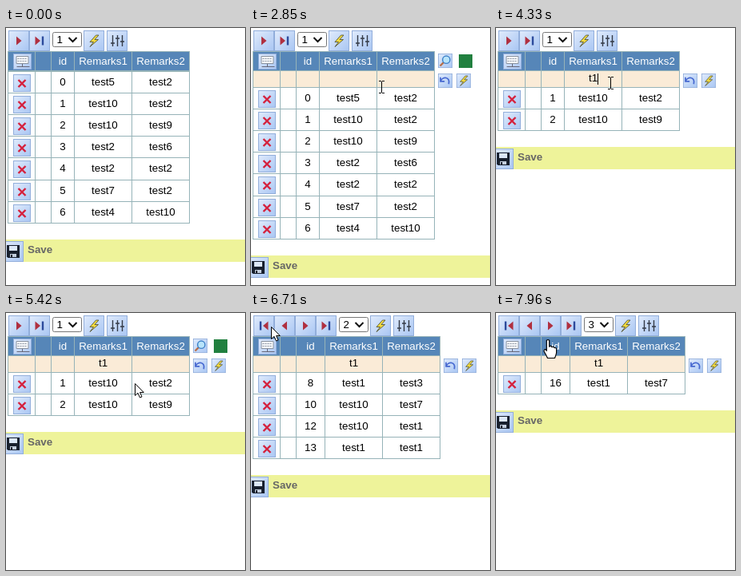
These frames come from a looping animation (299 by 322 pixels, 8 s). An HTML page:

```html
<!DOCTYPE html>
<html lang="en">
<head>
<meta charset="utf-8">
<title>Filtered table</title>
<style>
html, body { margin: 0; width: 100%; height: 100%; overflow: hidden; background: #fff; }
svg { display: block; width: 299px; height: 322px; }
text { font: 13.33px "Liberation Sans", Arial, sans-serif; }
</style>
</head>
<body>
<svg viewBox="0 0 299 322">
  <defs>
    <linearGradient id="face" x2="1" y2="1">
      <stop stop-color="#e0ebfc"/><stop offset="1" stop-color="#a9c6f3"/>
    </linearGradient>
    <path id="play" d="M-3-5.5L3.5 0L-3 5.5z" fill="#b03040"/>
    <g id="skip"><use href="#play" x="-2.5"/><path d="M4-5.5v11" stroke="#2c4a9c" stroke-width="2.4"/></g>
    <path id="bolt" d="M2.5-7L-5 1.5H-.5L-5 7.5L5.5-1.5H1L6-7z" fill="#f6dc3c" stroke="#55563a" stroke-width=".9"/>
    <path id="sliders" d="M-5.5-7V7M.5-7V7M6.5-7V7M-8 3h5M-2-3h5M4 1h5" fill="none" stroke="#343a46" stroke-width="1.4"/>
    <path id="cross" d="M-4.5-4L4.5 5M4.5-4L-4.5 5" stroke="#d5203c" stroke-width="2.4"/>
    <g id="keys">
      <path d="M-7.5-6.5H7.5V2.5H-7.5z" fill="#f5f7fa" stroke="#8a93a0"/>
      <path d="M-6-3.5H6M-6-.5H6" stroke="#8a93a0" stroke-dasharray="2 1"/>
      <path d="M0 3V6M-7 6.5H9" stroke="#667"/>
    </g>
    <g id="lens">
      <path d="M-2 2L-7.5 7.5" stroke="#b9704a" stroke-width="2.8"/>
      <circle cx="1.5" cy="-1.5" r="5.4" fill="#b8e4fa" stroke="#3f83c9" stroke-width="1.7"/>
    </g>
    <path id="undo" d="M-7-5V1H-1M-7 1C-4-7 8-6 5 5" fill="none" stroke="#4668d0" stroke-width="2"/>
    <g id="disk">
      <path d="M-8-8H8V8H-6.5L-8 6.5z" fill="#18202e"/>
      <path d="M-5-7H5V-1H-5z" fill="#dce8f8"/><path d="M-4 3H4V7H-4z" fill="#c3cedd"/>
      <path d="M-3 4H-1V7H-3z" fill="#18202e"/>
    </g>
    <path id="arrow" d="M.5.5V15.5L4 12.3L6.5 18L9 17L6.6 11.5H11.3z" fill="#fff" stroke="#000"/>
    <path id="hand" d="M-1.7 1.5Q0-.5 1.7 1.5V9Q4 7.5 5 9.7Q7.5 8.5 8 10.6Q10.6 10 10.6 12.6V17Q10 20 8.5 23.5H-.5Q-2 20-5 15Q-5 11-1.7 14z" fill="#fff" stroke="#000" stroke-width="1.2"/>
    <path id="ibeam" d="M-3-7.5H0M1-7.5H4M-3 7.5H0M1 7.5H4M.5-7V7" fill="none" stroke="#000"/>
  </defs>
  <g id="scene"></g>
</svg>
<script>
const LOOP = 8000;
const scene = document.getElementById('scene');

// Rows: id, number in Remarks1, number in Remarks2
const allRows = [[0, 5, 2], [1, 10, 2], [2, 10, 9], [3, 2, 6], [4, 2, 2], [5, 7, 2], [6, 4, 10]];
const filteredPages = [
  allRows.slice(1, 3),
  [[8, 1, 3], [10, 10, 7], [12, 10, 1], [13, 1, 1]],
  [[16, 1, 7]]
];

// Pointer moves: start, end, steps, x, y, shape on arrival
const start = [284, 114];
const moves = [
  [530, 1000, 7, 218, 41, 'arrow'],
  [1600, 1810, 4, 250, 43, 'hand'],
  [2570, 2850, 5, 163, 74, 'ibeam'],
  [2940, 2940, 1, 162, 77, 'ibeam'],
  [3080, 3350, 5, 143, 69, 'ibeam'],
  [4480, 4630, 3, 170, 91, 'arrow'],
  [4780, 4840, 2, 176, 96, 'arrow'],
  [5360, 6060, 10, 26, 18, 'hand'],
  [6150, 6150, 1, 23, 17, 'hand'],
  [6210, 6300, 2, 20, 16, 'hand'],
  [6710, 7200, 8, 56, 24, 'arrow'],
  [7290, 7440, 3, 66, 10, 'hand'],
  [7750, 7810, 2, 63, 15, 'hand'],
  [7960, 7960, 1, 65, 33, 'hand']
];

const within = (t, a, b) => t >= a && t < b;
const rect = (x, y, w, h, fill, more = '') =>
  `<rect x="${x}" y="${y}" width="${w}" height="${h}" fill="${fill}" ${more}/>`;
const text = (s, x, y, fill = '#000', more = 'text-anchor="middle"') =>
  `<text x="${x}" y="${y}" fill="${fill}" ${more}>${s}</text>`;
const line = (d, color) => `<path d="${d}" stroke="${color}" fill="none"/>`;
const icon = (name, x, y, flip = 1) =>
  `<use href="#${name}" transform="translate(${x} ${y}) scale(${flip} 1)"/>`;

function button(name, x, y, w, h, flip) {
  return rect(x + .5, y + .5, w - 1, h - 1, 'url(#face)', 'stroke="#92aedb"') +
    icon(name, x + w / 2, y + h / 2, flip);
}
const smallIcon = (name, x, y) =>
  `<g transform="translate(${x} ${y}) scale(.86)">${button(name, 0, 0, 21, 21)}</g>`;

function toolbar(page) {
  const shift = page > 1 ? 52 : 0;
  let out = '';
  if (shift) out += button('skip', 3, 3, 26, 26, -1) + button('play', 29, 3, 26, 26, -1);
  out += button('play', 3 + shift, 3, 26, 26) + button('skip', 29 + shift, 3, 26, 26);
  out += rect(58.5 + shift, 5.5, 36, 18, '#fff', 'rx="2" stroke="#767676"');
  out += text(page, 63.5 + shift, 19, '#000', '');
  out += `<path d="M${78.5 + shift} 12l5 5l5-5" fill="none" stroke="#111" stroke-width="2"/>`;
  return out + button('bolt', 97 + shift, 3, 26, 26) + button('sliders', 126 + shift, 3, 26, 26);
}

function table(rows, d, filtering, query) {
  const cols = [2.5, 36.5, 56.5, 85.5 + d, 157.5 + d, 229.5 + d];
  const mid = i => (cols[i] + cols[i + 1]) / 2;
  const width = cols[5] - cols[0];
  const top = filtering ? 74 : 54;
  const rowTop = i => Math.floor(top + i * 27.2);
  const bottom = rowTop(rows.length);
  const grid = '#96b3b8';

  let out = rect(2.5, 30, width, 24, '#5686b8');
  out += button('keys', 9, 32, 23, 20);
  ['id', 'Remarks1', 'Remarks2'].forEach((s, i) => out += text(s, mid(i + 2), 46, '#fff'));
  if (filtering) out += rect(2.5, 54, width, 20, '#faebd7') + text(query, mid(3), 67);

  rows.forEach(([id, a, b], i) => {
    const y = rowTop(i);
    out += button('cross', 9, y + 4, 22, 22);
    out += text(id, mid(2), y + 18) + text('test' + a, mid(3), y + 18) + text('test' + b, mid(4), y + 18);
    out += line(`M2 ${y + .5}H${cols[5] + .5}`, grid);
  });
  out += line(`M2 29.5H${cols[5]}M2 53.5H${cols[5]}M2 ${bottom + .5}H${cols[5] + .5}`, grid);
  out += line(cols.map(x => `M${x} 29V${bottom + 1}`).join(''), grid);

  const bar = bottom + 21;
  out += rect(0, bar, 299, 28, '#eef39a') + button('disk', -4, bar + 2, 26, 26);
  return out + text('Save', 27, bar + 17, '#666', 'style="font-weight:bold"');
}

function suggestions(opacity) {
  const items = ['t1', 't2', 'test1', 'test2'];
  return `<g opacity="${opacity}">` + rect(85.5, 76.5, 230, 105, '#fff', 'stroke="#c4c4c4"') +
    items.map((s, i) => text(s, 92, 97 + i * 24, '#000', '')).join('') + '</g>';
}

function pointer(t) {
  if (t < moves[0][0]) return '';
  let [x, y] = start, shape = 'arrow';
  for (const [a, b, steps, toX, toY, toShape] of moves) {
    if (t < a) break;
    const step = b > a ? Math.min(steps, 1 + Math.floor((t - a) / (b - a) * (steps - 1))) : 1;
    const u = step / steps;
    x += (toX - x) * u;
    y += (toY - y) * u;
    shape = u > .85 ? toShape : shape === toShape ? shape : 'arrow';
  }
  return icon(shape, Math.round(x), Math.round(y));
}

function draw(t) {
  const page = t < 6710 ? 1 : t < 7750 ? 2 : 3;
  const filtering = t >= 2270;
  const d = page > 1 ? 7 : 0;
  const rows = t < 4330 ? allRows : filteredPages[page - 1];
  const query = t < 4010 ? '' : 't1';

  let out = toolbar(page) + table(rows, d, filtering, query);
  if (within(t, 740, 3650) || within(t, 5360, 6710) || within(t, 7060, 7750))
    out += smallIcon('lens', 234 + d, 32) + rect(260 + d, 33, 17, 17, '#21803f');
  if (filtering) out += smallIcon('undo', 234 + d, 57) + smallIcon('bolt', 257 + d, 57);
  if (within(t, 3080, 4070))
    out += suggestions(t < 4010 ? Math.min(1, (t - 3020) / 300) : .5);
  if (within(t, 3080, 3650) || within(t, 4010, 4780))
    out += line(`M${query ? 127.5 : 121.5} 57V71`, '#000');
  return out + pointer(t);
}

let shown;
function tick() {
  const picture = draw(performance.now() % LOOP);
  if (picture !== shown) scene.innerHTML = shown = picture;
  requestAnimationFrame(tick);
}
tick();
</script>
</body>
</html>
```
